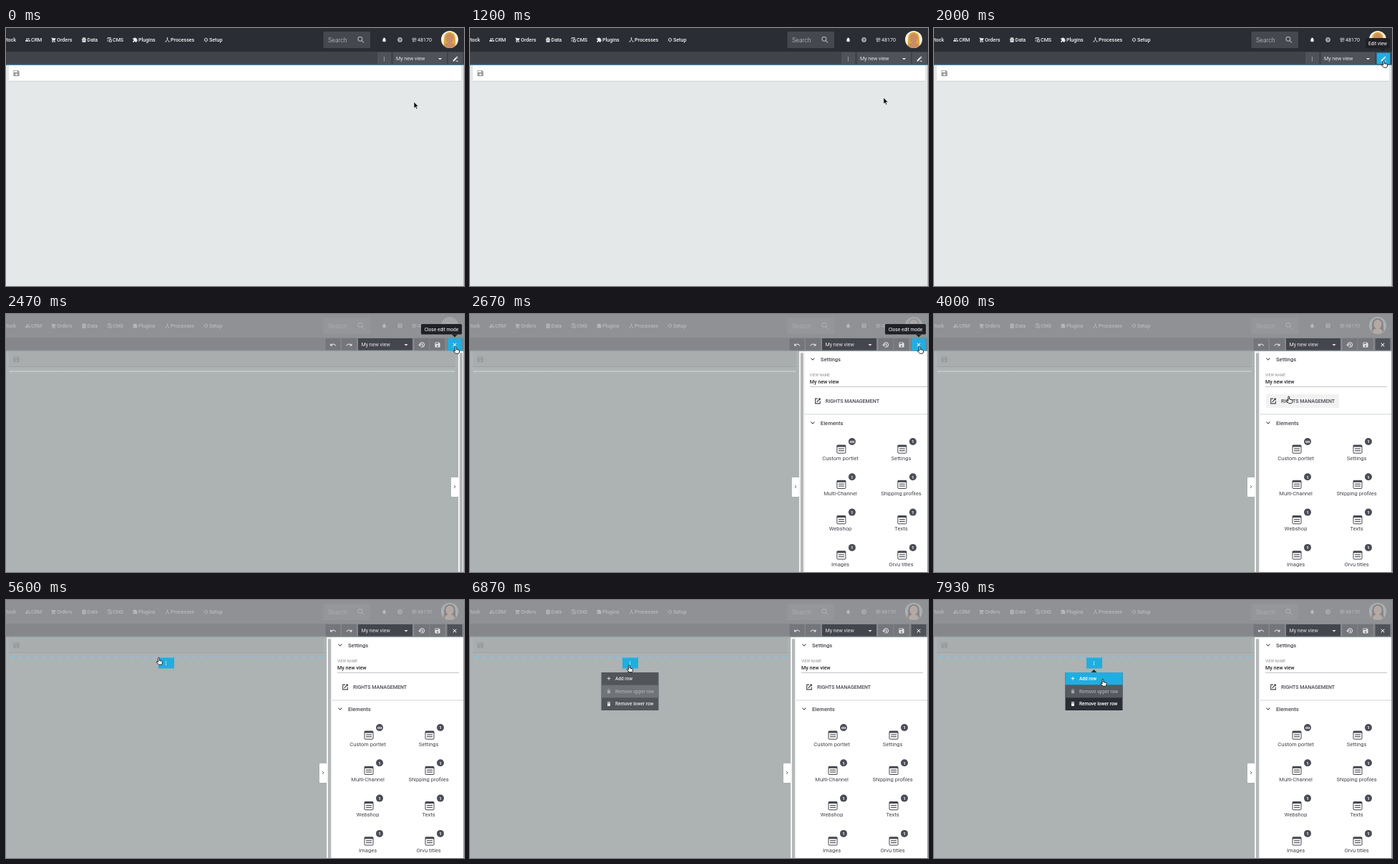
An HTML page that plays this animation: 640 by 360 pixels, repeating every 8000 ms.

```html
<!DOCTYPE html>
<html lang="en">
<head>
<meta charset="utf-8">
<title>View editor</title>
<style>
  html, body { margin: 0; width: 100%; height: 100%; overflow: hidden; background: #e4e8e8; }
  svg { display: block; width: 100vw; height: 100vh; font-family: Roboto, sans-serif; }
</style>
</head>
<body>
<svg id="stage" viewBox="0 0 640 360"></svg>
<script>
const LOOP = 8000, EDIT_START = 2470;
const BLUE = '#20aee0', DARK = '#2b2d35', INK = '#44464e';

// Icons on a 24 unit grid
const FILLED = {
  save: 'M17 3H5a2 2 0 0 0-2 2v14a2 2 0 0 0 2 2h14a2 2 0 0 0 2-2V7zM12 19a3 3 0 1 1 0-6 3 3 0 0 1 0 6zM15 9H5V5h10z',
  bell: 'M12 22a2 2 0 0 0 2-2h-4a2 2 0 0 0 2 2zm6-6v-5c0-3-1.6-5.6-4.5-6.3V4a1.5 1.5 0 0 0-3 0v.7C7.6 5.4 6 8 6 11v5l-2 2v1h16v-1z',
  people: 'M8 11a3 3 0 1 0 0-6 3 3 0 0 0 0 6zm8 0a3 3 0 1 0 0-6 3 3 0 0 0 0 6zM1 19v-3c0-4 14-4 14 0v3zm16 0v-3l-1-2.5c4 0 7 .5 7 2.5v3z',
  cart: 'M1 2h4l1 3h16l-4 9H8l-1 2h12v2H4l2-5L3 4H1zM6 19h4v4H6zM15 19h4v4h-4z',
  data: 'M5 2h14v5H5zM2 9h20v5H2zM4 16h16v6H4z',
  puzzle: 'M20 11h-1V5h-6a2.6 2.6 0 1 0-5 0H2v6a2.7 2.7 0 1 1 0 5v6h6a2.7 2.7 0 1 1 5 0h6v-6a2.6 2.6 0 1 0 1-5z',
  store: 'M3 3h18v3H3zM2 8h20v5H2zM4 15h10v6H4zM17 15h3v6h-3z',
  trash: 'M6 8h12v11a2 2 0 0 1-2 2H8a2 2 0 0 1-2-2zM5 4h4l1-1h4l1 1h4v2H5z',
  undo: 'M12.5 8c-2.6 0-5 1-6.9 2.6L2 7v9h9l-3.6-3.6c4-3.4 11-1.8 12.7 3.6l2.4-.8C21 11 17 8 12.5 8z',
  pencil: 'M3 17.2V21h3.8L17.8 10 14 6.2zM15 5l2.5-2.5 4 4L19 9zM14 19h8v3h-8z',
  caret: 'M5 9h14l-7 7z',
  more: 'M10 3h4v4h-4zM10 10h4v4h-4zM10 17h4v4h-4z'
};
const STROKED = {
  search: 'M14.5 14.5L21 21M16 9.5a6.5 6.5 0 1 1-13 0 6.5 6.5 0 0 1 13 0z',
  page: 'M4 10V3h14v6M4 14v4h4M9 7h6M12 12h9v9h-9z',
  flow: 'M12 3v8L5 19M12 11l7 8M9 4h6M2 20h6M16 20h6',
  gear: 'M12 6a6 6 0 1 0 .01 0M12 2v4M12 18v4M3.5 7l3.5 2M17 15l3.5 2M3.5 17L7 15M17 9l3.5-2',
  history: 'M5 12a8 8 0 1 1 3 6M1 11l4 4 4-4M13 7v6l4 2',
  close: 'M6 6l12 12M18 6L6 18',
  plus: 'M12 5v14M5 12h14',
  down: 'M5 8l7 7 7-7',
  right: 'M9 5l7 7-7 7',
  open: 'M12 4H4v16h16v-8M15 4h5v5M20 4L9 15'
};

const rect = (x, y, w, h, fill, extra = '') =>
  `<rect x="${x}" y="${y}" width="${w}" height="${h}" fill="${fill}" ${extra}/>`;
const circle = (x, y, r, fill) => `<circle cx="${x}" cy="${y}" r="${r}" fill="${fill}"/>`;
const text = (x, middle, label, size, fill, weight = 400, anchor = 'start') =>
  `<text x="${x}" y="${middle + size * .355}" font-size="${size}" fill="${fill}" font-weight="${weight}" text-anchor="${anchor}">${label}</text>`;
const group = (id, content) => `<g id="${id}">${content}</g>`;

function icon(name, x, y, size, color, flip = 1) {
  const paint = FILLED[name]
    ? `d="${FILLED[name]}" fill="${color}" fill-rule="evenodd"`
    : `d="${STROKED[name]}" fill="none" stroke="${color}" stroke-width="2.7"`;
  const s = size / 24;
  return `<path transform="translate(${x} ${y}) scale(${s * flip} ${s}) translate(-12 -12)" ${paint}/>`;
}

function avatar(id, back, hair, body) {
  return group(id, circle(620, 16, 12, back) +
    `<path d="M611.5 24c1-5 0-8 1-12a7.6 7.6 0 0 1 15 0c1 4 0 7 1 12a12 12 0 0 1-17 0z" fill="${hair}"/>` +
    `<path d="M613 25.8c0-4 3-5 5-5.5a5.5 6.5 0 1 1 4 0c2 .5 5 1.5 5 5.5a12 12 0 0 1-14 0z" fill="${body}"/>`);
}

function header(c) {
  const nav = [['people', 35, 'CRM'], ['cart', 71, 'Orders'], ['data', 113.5, 'Data'], ['page', 149, 'CMS'],
    ['puzzle', 185, 'Plugins'], ['flow', 230, 'Processes'], ['gear', 284, 'Setup']];
  return rect(0, 0, 640, 33, c.top) + rect(0, 33, 640, 18, c.bar) + rect(0, 50.5, 640, 1.3, c.edge) +
    text(14, 16.5, 'Stock', 7.1, c.ink, 500, 'end') +
    nav.map(([name, x, label]) => icon(name, x - 4.5, 16.5, 7.5, c.ink) + text(x, 16.5, label, 7.1, c.ink, 500)).join('') +
    rect(443.5, 5, 65.5, 23, c.field, 'rx="1"') + text(450, 16.5, 'Search', 8.6, c.hint) +
    icon('search', 496, 16.5, 11, c.hint) + icon('bell', 528.5, 16.5, 8, c.ink) +
    circle(550.5, 16.5, 3.4, c.hint) + text(550.5, 16.6, '?', 5.5, c.top, 700, 'middle') +
    icon('store', 570.5, 16.5, 7.5, c.hint) + text(575, 16.5, '48170', 7.1, c.ink);
}

const tooltip = (id, x, label) =>
  group(id, rect(x, 14, 637 - x, 14.5, '#202127', 'rx="1.5"') + '<path d="M623 28.5h8l-4 4z" fill="#202127"/>' +
    text((x + 637) / 2, 21.5, label, 6.6, '#fff', 400, 'middle'));

function viewScene() {
  const button = '#50525a';
  return header({ top: DARK, bar: '#41434b', edge: '#2f6f8d', ink: '#f4f4f5', field: '#464850', hint: '#a5a6ab' }) +
    avatar('avatar', '#f6efdb', '#dfa642', '#c98d63') +
    rect(519, 34, 19, 16.5, button) + icon('more', 528.5, 43, 7, '#d8d8da') +
    rect(541, 34, 75, 16.5, button) + text(545, 42.7, 'My new view', 7.1, '#e8e8ea') + icon('caret', 606.5, 43, 9, '#e8e8ea') +
    rect(618, 34, 20, 16.5, button) +
    group('editHover', rect(618, 34, 20, 17, BLUE) + rect(618.5, 34.5, 19, 16, 'none', `stroke="${DARK}" stroke-dasharray="1 1"`)) +
    icon('pencil', 628, 43, 9, '#f0f0f0') +
    rect(4, 74, 632, 1, '#d3d7d7') + rect(4, 52, 632, 21.5, '#fff') + icon('save', 14.5, 63, 11, '#9b9b9b') +
    rect(639, 52, 1, 308, '#b4b8b9') + tooltip('editTip', 603, 'Edit view');
}

const toolButton = (name, x, flip) =>
  rect(x - 10.5, 34, 21, 16.5, '#74767b') + icon(name, x, 43, 9.5, '#e4e4e6', flip);

function panel() {
  const names = ['Custom portlet', 'Settings', 'Multi-Channel', 'Shipping profiles', 'Webshop', 'Texts', 'Images', 'Orvu titles'];
  const tiles = names.map((name, i) => {
    const x = 506 + i % 2 * 85, y = Math.floor(i / 2) * 49.3;
    return rect(x - 5, y + 183, 12, 11.2, 'none', `rx="1" stroke="${INK}"`) + rect(x - 5, y + 183, 12, 2.5, INK) +
      rect(x - 3, y + 187.4, 8, 1.1, INK) + rect(x - 3, y + 190.2, 8, 1.1, INK) +
      circle(x + 16, y + 178, 5, '#4b4d56') + text(x + 16, y + 178, i ? '1' : '∞', 6.2, '#fff', 700, 'middle') +
      text(x - .4, y + 201.2, name, 7.6, INK, 400, 'middle');
  }).join('');
  return rect(448, 52, 8, 308, '#f4f5f5') + rect(450, 54, 4, 310, '#b4b6b7', 'rx="2"') +
    rect(438, 228, 10, 27, '#fff', 'rx="1"') + icon('right', 442.8, 241, 7, INK) +
    rect(456, 52, 190, 308, '#fff') +
    icon('down', 467, 63, 9, INK) + text(478, 63, 'Settings', 7.6, INK, 500) +
    text(463, 85.5, 'VIEW NAME', 5.2, '#8b8d92') + text(463, 94, 'My new view', 7.1, '#25262b', 500) +
    rect(463, 101, 170, .8, '#b5b6b9') +
    group('rightsHover', rect(464, 112, 102, 19, '#f2f2f3', 'rx="1"')) +
    icon('open', 474, 121.5, 10, INK) + text(485, 121.5, 'RIGHTS MANAGEMENT', 7.05, INK, 500) +
    rect(456, 139.3, 190, 1.2, '#d9dadb') +
    icon('down', 467, 152, 9, INK) + text(478, 152, 'Elements', 7.6, INK, 500) + tiles;
}

function rowMenu() {
  return `<path d="M219 101.5l4.5-4.5 4.5 4.5z" fill="${DARK}"/>` + rect(183.5, 101, 80, 53, DARK) +
    group('addHover', rect(183.5, 101, 80, 17.7, BLUE)) + rect(183.5, 118.7, 80, 17.6, '#565a60') +
    icon('plus', 194, 109.5, 8, '#fff') + text(203, 109.5, 'Add row', 6.5, '#fff', 500) +
    icon('trash', 194, 127.3, 8, '#a4a7aa') + text(203, 127.3, 'Remove upper row', 6.5, '#a4a7aa', 500) +
    icon('trash', 194, 145, 8, '#fff') + text(203, 145, 'Remove lower row', 6.5, '#fff', 500);
}

const rowLine = color =>
  `<path class="rowLine" stroke="${color}" stroke-width="1.1" stroke-dasharray="1.3 .9"/>`;

function editScene() {
  return rect(0, 0, 640, 360, '#adb2b3') +
    header({ top: '#8f9194', bar: '#85878b', edge: '#909ba0', ink: '#b8b9bc', field: '#949699', hint: '#a9abae' }) +
    circle(620, 16, 12, '#a3a5a7') + avatar('editAvatar', '#a7b1b6', '#8d8581', '#b3a9a5') +
    toolButton('undo', 457) + toolButton('undo', 479.5, -1) +
    rect(492, 34, 76, 16.5, '#44464e') + text(496.5, 42.7, 'My new view', 7.1, '#e8e8ea') + icon('caret', 559, 43, 9, '#e8e8ea') +
    toolButton('history', 581) + toolButton('save', 603) +
    rect(616.5, 34, 21, 16.5, '#50525a') + group('closeHover', rect(616.5, 34, 21, 17, BLUE)) + icon('close', 627, 43, 9, '#fff') +
    rect(4, 73, 0, 1, '#9fa3a4', 'class="rowWidth"') + rect(4, 52, 0, 21, '#a9adae', 'class="rowWidth"') +
    icon('save', 14.5, 63, 11, '#979b9c') + rowLine('#f3f4f4') +
    group('rowTools', rowLine(BLUE) + rect(213, 80.5, 22, 15, BLUE) + icon('more', 223.5, 88, 7, '#fff')) +
    group('menu', rowMenu()) + group('panel', panel()) + rect(639, 52, 1, 308, '#9a9d9e') +
    tooltip('closeTip', 580, 'Close edit mode');
}

const stage = document.getElementById('stage');
stage.innerHTML = group('view', viewScene()) + group('edit', editScene()) + group('cursor',
  `<path id="arrow" d="M0 0v9l2-1.8 1.4 3 1.5-.7-1.4-2.9h2.9z" fill="#111" stroke="#fff" stroke-width=".6"/>` +
  `<path id="hand" transform="translate(-.4 -1.2)" d="M-1 1a.9.9 0 0 1 1.8 0v3.2l3.4.8q1 .3.9 1.4l-.5 2.3q-.2.9-.9 1.2H-.1L-3.3 6.5q-.2-1 .9-.8l1.4.8z" fill="#fff" stroke="#111" stroke-width=".9"/>`);
const el = id => document.getElementById(id);
const setOpacity = (id, value) => el(id).setAttribute('opacity', value);
const setAll = (name, attribute, value) =>
  document.querySelectorAll('.' + name).forEach(node => node.setAttribute(attribute, value));
const show = (id, visible) => { el(id).style.display = visible ? '' : 'none'; };
const ramp = (t, from, to) => Math.min(1, Math.max(0, (t - from) / (to - from)));

// Cursor stops: time, x, y
const STOPS = [[0, 570, 103], [1000, 570, 103], [1800, 626, 54], [2000, 629, 46.5], [3200, 629, 46.5],
  [4000, 496.5, 116], [4870, 237, 99], [5400, 214, 81.5], [5600, 214, 81.5], [6000, 222.5, 91.5],
  [6270, 222.5, 91.5], [6330, 223, 92], [7470, 223, 92], [7930, 236.5, 111.5], [LOOP, 236.5, 111.5]];

// Monotone cubic through the stops, without overshoot
function cursorAxis(t, axis) {
  const slope = i => STOPS[i + 1] && STOPS[i]
    ? (STOPS[i + 1][axis] - STOPS[i][axis]) / (STOPS[i + 1][0] - STOPS[i][0]) : 0;
  const tangent = i => {
    const a = slope(i - 1), b = slope(i);
    return a * b > 0 ? 2 * a * b / (a + b) : 0;
  };
  let i = 0;
  while (i < STOPS.length - 2 && t >= STOPS[i + 1][0]) i++;
  const [from, to] = [STOPS[i], STOPS[i + 1]];
  const span = to[0] - from[0], p = (t - from[0]) / span, q = 1 - p;
  return from[axis] * q * q * (1 + 2 * p) + to[axis] * p * p * (3 - 2 * p) +
    span * p * q * (tangent(i) * q - tangent(i + 1) * p);
}

function draw(t) {
  const x = cursorAxis(t, 1), y = cursorAxis(t, 2);
  const within = (left, top, right, bottom) => x >= left && x <= right && y >= top && y <= bottom;
  const editing = t >= EDIT_START;
  const overCorner = within(617, 34, 638, 51.5);
  const overRights = editing && within(464, 112, 566, 131);
  const overRow = t >= 5000 && within(213, 80, 235, 96);
  const overAdd = t > 7130 && within(183, 101, 264, 118);

  show('view', !editing);
  show('edit', editing);
  show('editHover', overCorner);
  show('closeHover', overCorner);
  show('rightsHover', overRights);
  show('addHover', overAdd);
  setOpacity('editTip', ramp(t, 1860, 1990));
  setOpacity('closeTip', 1 - ramp(t, 3340, 3480));
  setOpacity('editAvatar', ramp(t, 2500, 2870));
  setOpacity('rowTools', ramp(t, 4900, 5100));
  setOpacity('menu', ramp(t, 6690, 6950));

  const shift = 184 * (1 - ramp(t, EDIT_START + 15, 2860)) ** 4;
  el('panel').setAttribute('transform', `translate(${shift} 0)`);
  setAll('rowLine', 'd', `M5 80H${443.5 + shift}`);
  setAll('rowWidth', 'width', 440 + shift);

  const pointing = overCorner || overRights || overRow || overAdd;
  show('hand', pointing);
  show('arrow', !pointing);
  el('cursor').setAttribute('transform', `translate(${x} ${y})`);
}

function tick() {
  draw(performance.now() % LOOP);
  requestAnimationFrame(tick);
}
tick();
</script>
</body>
</html>
```
